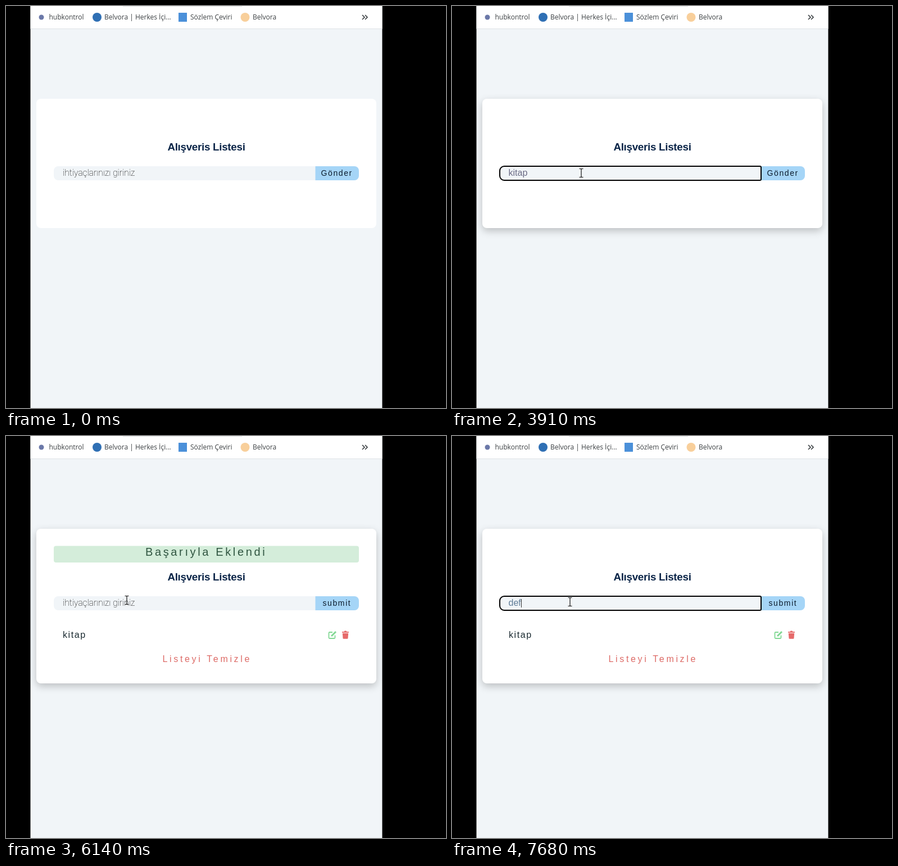
An HTML page for the animation above (8 s loop, 783 by 715 pixels).

```html
<!DOCTYPE html>
<html lang="tr">
<head>
<meta charset="utf-8">
<title>Alışveris Listesi</title>
<style>
html, body { margin: 0; width: 100%; height: 100%; overflow: hidden; background: #000; }
svg { display: block; }
text { font: 16px "Liberation Sans", Arial, sans-serif; white-space: pre; }
.ui text { font: 12px "Open Sans", "Noto Sans", sans-serif; fill: #3c4043; }
.title { font-size: 18.72px; font-weight: bold; letter-spacing: -.25px; fill: #0a2447; }
.hint { font-family: Roboto, sans-serif; font-weight: 200; letter-spacing: -.15px; fill: #000; }
.btn { font-size: 14px; letter-spacing: 1.6px; }
.shadow { filter: drop-shadow(0 5px 7px rgba(0, 0, 0, .22)); }
#popup { filter: drop-shadow(0 1px 2px rgba(0, 0, 0, .3)); }
</style>
</head>
<body>
<svg width="783" height="715" viewBox="0 0 783 715">
  <svg x="43" width="627" height="715" viewBox="43 0 627 715">
    <path fill="#f1f5f8" d="M43.500 0h626v715h-626z"/>
    <path fill="#fff" d="M43.500 0h626v40h-626z"/>
    <path stroke="#dfe3e6" d="M43.500 40.500h626M208 .5h212"/>
    <g class="ui">
      <circle cx="63" cy="20" r="4.500" fill="#6b78a8"/>
      <circle cx="162" cy="20" r="8" fill="#2f6fb4"/>
      <path fill="#4b90d9" d="M307 12h15v16h-15z"/>
      <circle cx="425.500" cy="20" r="8" fill="#f8cf9b"/>
      <text x="76.500" y="24">hubkontrol</text>
      <text x="175" y="24">Belvora | Herkes İçi...</text>
      <text x="328" y="24">Sözlem Çeviri</text>
      <text x="439" y="24">Belvora</text>
      <path fill="none" stroke="#3c4043" stroke-width="1.700" d="M634 16l4 4-4 4M639 16l4 4-4 4"/>
    </g>

    <rect id="card" x="54" y="165" width="605" rx="8" fill="#fff"/>
    <g id="alert">
      <rect x="85" y="195.500" width="543" height="29.500" rx="4" fill="#d4edda"/>
      <text x="248" y="213" fill="#2f5540" style="font-size:20px;letter-spacing:3.63px">Başarıyla Eklendi</text>
    </g>
    <text class="title" x="356.500" y="257" text-anchor="middle">Alışveris Listesi</text>

    <path fill="#f1f5f8" d="M93 285h458v25H93a8 8 0 0 1-8-8v-9a8 8 0 0 1 8-8z"/>
    <path id="button" d="M550.500 285H620a8 8 0 0 1 8 8v9a8 8 0 0 1-8 8h-69.500z"/>
    <path id="focus" fill="none" stroke="#000" stroke-width="2" d="M93 285h455q2 0 2 2v21q0 2-2 2H93a8 8 0 0 1-8-8v-9a8 8 0 0 1 8-8z"/>
    <text id="hint" class="hint" x="101" y="302">ihtiyaçlarınızı giriniz</text>
    <text id="typed" x="100.500" y="302"></text>
    <path id="caret" stroke="#333" d="M.5 290v15"/>
    <text id="label" class="btn" y="302"></text>

    <g id="list">
      <text x="101" y="359" fill="#1a2a30" style="letter-spacing:1.6px">kitap</text>
      <g fill="none" stroke="#82d894" stroke-width="1.800">
        <path d="M581 349h-5q-1.500 0-1.500 1.500v8q0 1.500 1.500 1.500h8q1.500 0 1.500-1.500v-4"/>
        <path stroke-width="3" d="M579 356l8-8"/>
      </g>
      <path fill="#e66a6a" d="M598 348h3.500l1-1.500h3l1 1.500h3.500v1.700h-12zM598.800 350.700h10.400l-.7 9q-.1 1-1.200 1h-6.600q-1.100 0-1.200-1z"/>
      <text x="278.500" y="402" fill="#dd6a66" style="letter-spacing:3.65px">Listeyi Temizle</text>
    </g>

    <g id="popup" class="ui">
      <path fill="#fff" d="M192 320l9-9 9 9z"/>
      <rect id="panel" x="181" y="319" width="151.500" rx="3" fill="#fff"/>
      <g id="items"></g>
    </g>
  </svg>

  <g id="pointer">
    <circle id="click" cx="-1.500" r="12" fill="#f5ee1e"/>
    <path id="arrow" fill="#fff" stroke="#000" d="M0-.5v16l3.700-3.500 2.500 5.700 2.400-1-2.500-5.600h5z"/>
    <path id="beam" fill="none" stroke="#111" stroke-width="1.200" d="M-3.500-7.500h2.500q1 0 1 1v13q0 1-1 1h-2.500M3.500-7.500H1q-1 0-1 1M0 6.500q0 1 1 1h2.500"/>
    <path id="hand" fill="#fff" stroke="#000" stroke-linejoin="round" d="M-1 12V2q0-1.500 1.500-1.500T2 2v6q1.500-1.500 3 .3 1.600-1.300 3 .5 2.200-.8 2.700 1.200v5.500q0 2-1.700 4V22H0v-2q-1-2-3.500-5-1.800-2.200-.5-3.200t3 1.200z"/>
  </g>
</svg>
<script>
const LOOP = 8000;
const $ = id => document.getElementById(id);
const show = (id, on) => $(id).style.display = on ? '' : 'none';
const within = (t, a, b) => t >= a && t < b;
const ramp = (t, a, b) => Math.min(1, Math.max(0, (t - a) / (b - a)));

// time, x, y of the pointer's hot spot
const path = [
  [70, 734, 669], [200, 640, 600], [400, 440, 462], [530, 325, 380], [660, 257, 331],
  [760, 236, 312], [830, 230, 297], [4070, 230, 297], [4120, 285, 265], [4190, 420, 220],
  [4250, 525, 205], [4340, 525, 205], [4390, 560, 235], [4460, 580, 280], [4520, 586, 308],
  [4650, 583, 304], [5200, 583, 304], [5270, 535, 288], [5340, 440, 274], [5470, 275, 281],
  [5540, 242, 284], [5670, 225, 286], [5870, 225, 286], [6280, 210, 295], [LOOP, 210, 295]
];
// time, field content
const typing = [
  [1230, ''], [2160, 'k'], [2420, 'ki'], [2830, 'kit'], [3180, 'kita'], [3380, 'kitap'],
  [5200, ''], [6480, ''], [7210, 'd'], [7480, 'de'], [7680, 'def']
];
const history = ['dasd', 'ad', 'sdf', 'asd', 'add', 'asdfasd'];
const matches = ['dasd', 'dfsdfs'];
// start, end, entries, rows of panel height
const popups = [
  [1230, 2160, history, 6], [2160, 2560, ['kjh'], 1],
  [6480, 7210, history, 6], [7210, 7410, matches, 6], [7410, 7610, matches, 2]
];
const clicks = [[1230, 1360], [4930, 5200], [6480, 6610]];

function pointerAt(t) {
  const i = Math.max(1, path.findIndex(p => p[0] > t));
  const [a, b] = [path[i - 1], path[i]];
  const k = ramp(t, a[0], b[0]);
  return [a[1] + (b[1] - a[1]) * k, a[2] + (b[2] - a[2]) * k];
}

function drawPointer(t) {
  const [x, y] = pointerAt(t);
  const inRow = y >= 285 && y <= 310;
  const overButton = inRow && x >= 550 && x <= 628;
  const overField = inRow && x >= 85 && x < 550;
  show('pointer', t >= 70);
  $('pointer').setAttribute('transform', `translate(${Math.round(x)} ${Math.round(y)})`);
  show('hand', overButton);
  show('beam', overField);
  show('arrow', !overButton && !overField);
  const click = clicks.find(c => within(t, ...c));
  show('click', click);
  if (click) $('click').setAttribute('opacity', .85 - .25 * ramp(t, click[0], click[0] + 250));
  return overButton;
}

function drawField(t) {
  const [since, value] = typing.findLast(s => s[0] <= t) || [0, ''];
  const focused = within(t, 1230, 4930) || t >= 6480;
  $('typed').textContent = value;
  $('typed').setAttribute('fill', t < 2420 ? '#6a5f94' : t < 5200 ? '#6b6b85' : '#617d98');
  show('hint', !value);
  show('focus', focused);
  show('caret', focused && (t - since) % 1060 < 530);
  const end = value ? Math.round(100.5 + $('typed').getComputedTextLength()) : 101;
  $('caret').setAttribute('transform', `translate(${end})`);
}

function drawPopup(t) {
  const popup = popups.find(p => within(t, p[0], p[1]));
  show('popup', popup);
  if (!popup) return;
  const [, , entries, rows] = popup;
  $('panel').setAttribute('height', 7 + 35 * rows);
  $('items').innerHTML = entries.map((s, i) =>
    `<text x="193" y="${345 + 35 * i}"${s === 'kjh' ? ' style="fill:#6a5f94"' : ''}>${s}</text>`).join('');
  const fade = t < 3000 ? ramp(t, 2420, 2630) : ramp(t, 7480, 7680);
  $('popup').setAttribute('opacity', 1 - fade);
}

function draw(t) {
  const added = t >= 5200;
  const hover = drawPointer(t);
  $('card').setAttribute('height', added ? 275 : 230);
  $('card').setAttribute('class', t >= 1230 ? 'shadow' : '');
  show('alert', within(t, 5200, 6200));
  show('list', added);
  $('button').setAttribute('fill', hover ? '#4aa5e8' : '#a5d5f7');
  $('label').textContent = added ? 'submit' : 'Gönder';
  $('label').setAttribute('x', added ? 563.5 : 560.5);
  $('label').setAttribute('fill', hover ? '#fff' : '#0c1c2c');
  drawField(t);
  drawPopup(t);
}

const start = performance.now();
function tick() {
  draw((performance.now() - start) % LOOP);
  requestAnimationFrame(tick);
}
tick();
</script>
</body>
</html>
```
